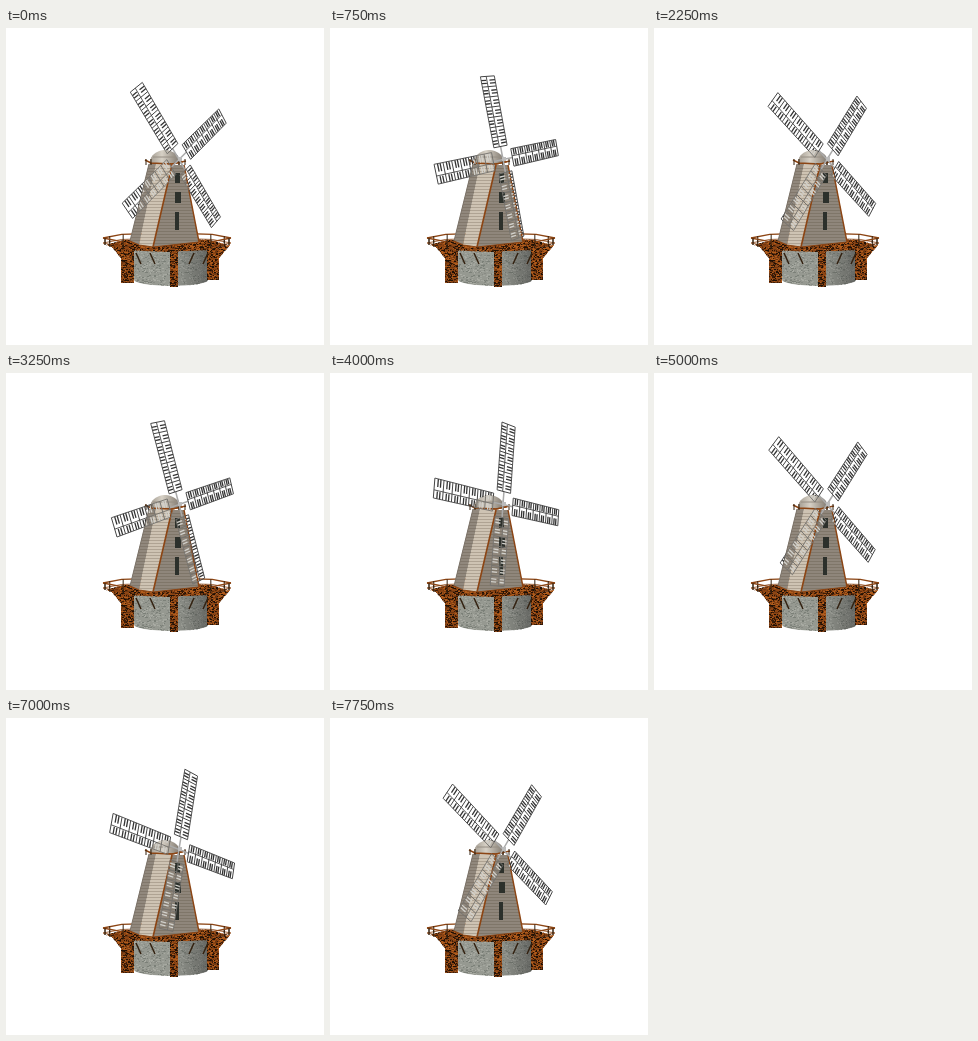
Write an HTML page with a canvas that moves like this. It is 318 px wide and 317 px high and loops after 8 s.

```html
<!DOCTYPE html>
<html>
<head>
<meta charset="utf-8">
<style>
html, body { margin: 0; width: 318px; height: 317px; overflow: hidden; background: #fff; }
canvas { display: block; }
</style>
</head>
<body>
<canvas id="stage" width="318" height="317"></canvas>
<script>
const ctx = document.getElementById('stage').getContext('2d');
const scenery = document.createElement('canvas');
scenery.width = 318;
scenery.height = 317;
const bg = scenery.getContext('2d');
const brown = '#8c4514', dark = '#32200f';

let seed = 7;
const random = () => (seed = seed * 16807 % 2147483647) / 2147483647;

function polygon(points) {
  const path = new Path2D();
  for (const p of points) path.lineTo(...p);
  return path;
}
function line(target, color, width, ...points) {
  target.strokeStyle = color;
  target.lineWidth = width;
  target.stroke(polygon(points));
}
function fill(color, path) {
  bg.fillStyle = color;
  bg.fill(path);
}
// Fill a path, then scatter small specks over it
function textured(path, color, specks, density) {
  bg.save();
  bg.clip(path);
  fill(color, path);
  for (let i = 0; i < 130 * 56 * density; i++) {
    bg.fillStyle = specks[Math.floor(random() * specks.length)];
    bg.fillRect(Math.floor(96 + random() * 130), Math.floor(204 + random() * 56), 1 + Math.floor(random() * 2), 1);
  }
  bg.restore();
}
const wooden = path => textured(path, brown, ['#3a1c08', '#b05c1c', '#1f1005', '#6e3610'], .7);

// Octagon seen from the side; corner 0 is the right end, corners 1 to 3 are in front
const corner = (i, y, rx, ry) =>
  [161 + rx * Math.cos(i * Math.PI / 4), y + ry * Math.sin(i * Math.PI / 4)];
const ring = (from, to, ...size) =>
  Array.from({ length: to - from + 1 }, (_, i) => corner(from + i, ...size));

function drawBase() {
  const wall = new Path2D();
  wall.rect(128, 220, 75, 32);
  wall.ellipse(165, 252, 37, 6, 0, 0, Math.PI);
  textured(wall, '#969991', ['#888b84', '#a3a69e', '#7b8078', '#a9aba3'], .25);
  const shade = bg.createLinearGradient(128, 0, 203, 0);
  shade.addColorStop(.5, 'rgba(50,50,50,0)');
  shade.addColorStop(1, 'rgba(50,50,50,.5)');
  fill(shade, wall);

  for (const [x, w, bottom] of [[115, 13, 255], [164, 8, 259], [201, 12, 252]]) {
    const post = new Path2D();
    post.rect(x, 220, w, bottom - 220);
    wooden(post);
  }
  for (const side of [-1, 1]) {
    const x = 164 + side * 49;
    wooden(polygon([[x, 219], [x + side * 11, 217], [x, 230]]));
    for (const d of [17, 31]) line(bg, dark, 1.5, [166 + side * d, 236], [166 + side * (d + 5), 225]);
  }
  wooden(polygon(ring(0, 7, 217, 61, 7)));
}

function drawRail(from, to) {
  for (const drop of [0, 5]) line(bg, brown, 1.3 - drop / 10, ...ring(from, to, 210 + drop, 64, 5));
  for (let i = from; i <= to; i += .5) {
    const [x, y] = corner(i, 210, 62, 5);
    line(bg, dark, 1, [x, y], [x, y + 7]);
  }
}

// Upright edges of the tower, from top to foot
const edges = [
  [[143, 136], [124, 213]],
  [[150, 136], [133, 217]],
  [[166, 137], [147, 219]],
  [[178, 137], [193, 214]]
];
const tower = polygon([...edges.map(e => e[1]), edges[3][0], [173, 127], [159, 122], [146, 127], edges[0][0]]);

function drawTower() {
  ['#91887d', '#cec3b3', '#8f867b'].forEach((color, i) => {
    const [a, b] = edges[i], [c, d] = edges[i + 1];
    fill(color, polygon([a, c, d, b]));
  });
  bg.save();
  bg.clip(tower);
  for (let y = 140; y < 218; y += 3) line(bg, 'rgba(80,68,55,.25)', 1, [124, y + .5], [194, y + .5]);
  bg.restore();
  line(bg, '#7d746a', 1, ...edges[0]);
  line(bg, brown, 1.6, ...edges[2]);
  line(bg, brown, 1.4, ...edges[3]);
  line(bg, brown, 1.2, ...edges.map(e => e[1]));
  bg.fillStyle = '#2c302b';
  for (const [y, h, w] of [[145, 10, 5], [164, 11, 6], [184, 18, 4]]) bg.fillRect(169, y, w, h);

  const cap = bg.createLinearGradient(144, 0, 174, 0);
  cap.addColorStop(0, '#a29b90');
  cap.addColorStop(.4, '#d6d0c5');
  cap.addColorStop(1, '#7f776d');
  const dome = new Path2D();
  dome.ellipse(159, 135, 15, 13, 0, Math.PI, 0);
  fill(cap, dome);
  line(bg, '#968e83', 1, [147, 129], [171, 129]);
  line(bg, brown, 1.5, [139, 132], [145, 135], [166, 136], [180, 133]);
  for (const x of [140, 145, 173, 179]) line(bg, dark, 1, [x, 131], [x, 137]);
}

drawBase();
drawRail(4, 8);
drawTower();
drawRail(0, 1);
drawRail(3, 4);

// Sail plane in perspective: along = distance from hub, across = sideways offset
function project(angle, along, across) {
  const skew = .087;
  const side = along * Math.sin(angle) + across * Math.cos(angle);
  const rise = along * Math.cos(angle + skew) - across * Math.sin(angle + skew);
  const scale = 1 / (1 + .11 * side);
  return [173 + 61.6 * side * scale, 131.5 - 82 * rise * scale];
}

function drawSail(angle, frameColor, rungColor) {
  const bar = (color, width, ...ends) =>
    line(ctx, color, width, ...ends.map(([along, across]) => project(angle, along, across)));
  const half = .11, inner = .16, bays = 7;
  bar('#aaa', 1.5, [0, 0], [inner, 0]);
  // Each bay has one full rung and a heavier broken pair beside it
  for (let i = 0; i <= bays; i++) {
    const r = inner + (1 - inner) * i / bays;
    bar(frameColor, 1, [r, -half], [r, half]);
    if (i == bays) break;
    for (const r2 of [r + .04, r + .075]) {
      bar(rungColor, 1.3, [r2, -half], [r2, -.03]);
      bar(rungColor, 1.3, [r2, .02], [r2, half]);
    }
  }
  for (const w of [-half, -.02, half]) bar(frameColor, .9, [inner, w], [1, w]);
}

function drawSails(turn, frameColor, rungColor) {
  for (let i = 0; i < 4; i++) drawSail(turn + i * Math.PI / 2, frameColor, rungColor);
}

function draw() {
  const step = Math.floor(performance.now() % 8000 / 250);
  const turn = (50 + 8.24 * step + 3.5 * Math.sin(Math.PI * step / 31)) * Math.PI / 180;
  ctx.fillStyle = '#fff';
  ctx.fillRect(0, 0, 318, 317);
  ctx.drawImage(scenery, 0, 0);
  drawSails(turn, '#444', '#333');
  // Sails look paler where they pass over the tower
  ctx.save();
  ctx.clip(tower);
  ctx.drawImage(scenery, 0, 0);
  drawSails(turn, '#75736f', '#d2d1cc');
  ctx.restore();
  ctx.fillStyle = '#bbb';
  ctx.fillRect(172, 129, 4, 4);
  requestAnimationFrame(draw);
}
draw();
</script>
</body>
</html>
```
